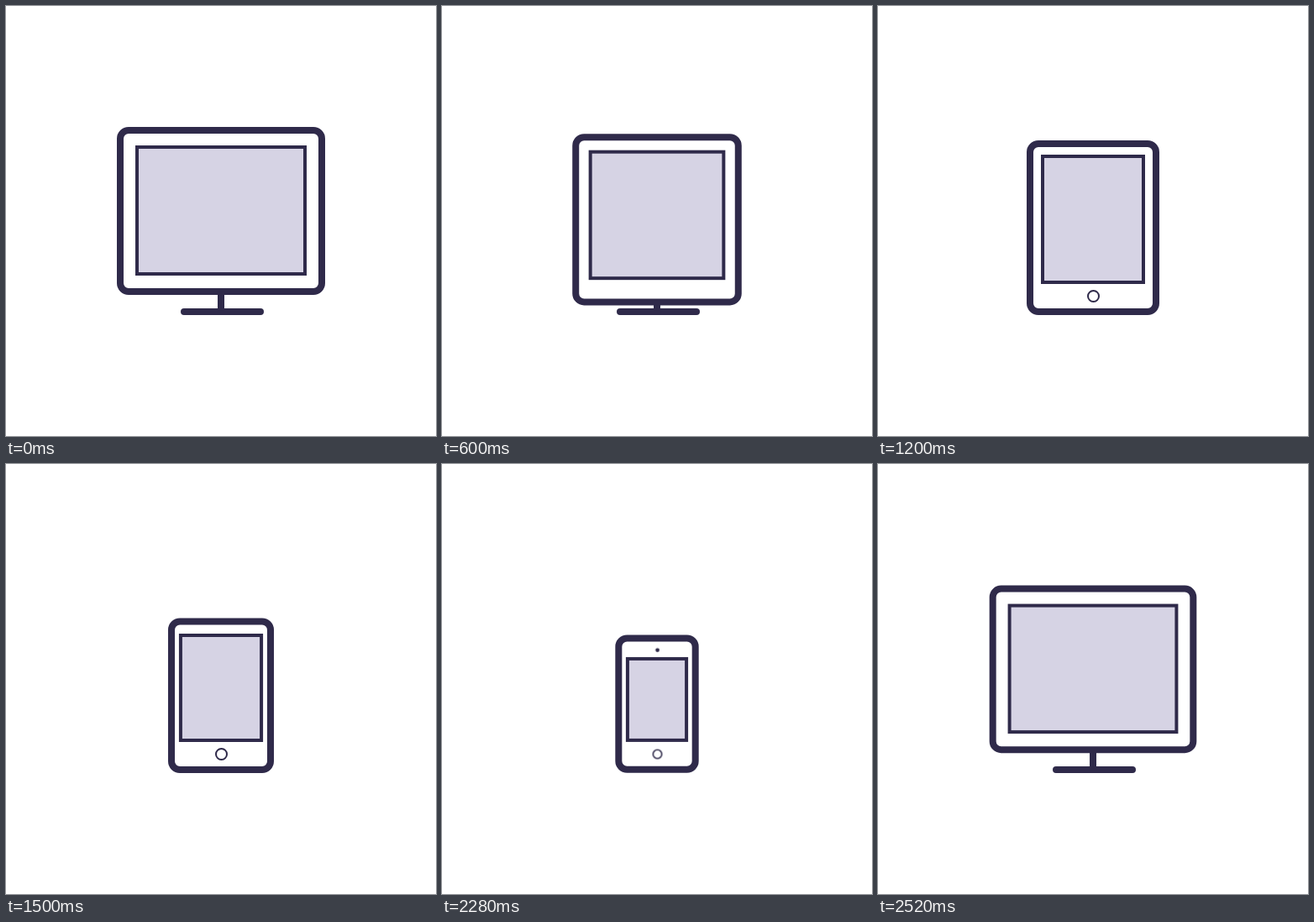
Recreate the animation shown at these times as an HTML page. Size 512 by 512 pixels, loop 2.55 s.

```html
<!DOCTYPE html>
<html lang="en">
<head>
<meta charset="utf-8">
<title>Responsive devices</title>
<style>
  html, body { margin: 0; width: 100%; height: 100%; overflow: hidden; background: #fff; }
  svg { display: block; width: 100%; height: 100%; }

  .stand, .body, .screen, .button { stroke: #2f2a4a; }
  .stand { fill: none; stroke-width: 8; stroke-linecap: round; }
  .body { fill: #fff; stroke-width: 8; rx: 10px; }
  .screen { fill: #d6d3e4; stroke-width: 4; }
  .button { fill: none; stroke-width: 2; }
  .camera { fill: #2f2a4a; }
  .button, .camera { transform-box: fill-box; transform-origin: center; }

  .stand, .body, .screen, .button, .camera {
    animation: 2550ms cubic-bezier(.333, 0, .667, 1) infinite;
  }
  .body { animation-name: body; }
  .screen { animation-name: screen; }
  .stand { animation-name: stand; animation-timing-function: step-end; }
  .button { animation-name: button; animation-timing-function: linear; }
  .camera { animation-name: camera; animation-timing-function: linear; }

  /* desktop, tablet, phone, desktop */
  @keyframes body {
    0%, 18.12%, 99.41%, 100% { x: 136px; y: 148px; width: 240px; height: 192px; }
    28.71%, 53.29% { x: 181px; y: 164px; width: 150px; height: 200px; }
    63.88%, 88.82% { x: 211px; y: 208px; width: 90px; height: 156px; }
  }
  @keyframes screen {
    0%, 18.12%, 99.41%, 100% { x: 156px; y: 168px; width: 200px; height: 151px; }
    28.71%, 53.76% { x: 196px; y: 179px; width: 120px; height: 150px; }
    64.35%, 88.82% { x: 221.5px; y: 232.5px; width: 69px; height: 96.5px; }
  }
  @keyframes stand {
    0%, 90.2%, 100% { visibility: visible; }
    39.2% { visibility: hidden; }
  }
  @keyframes button {
    0%, 23.53%, 94.12%, 100% { transform: scale(0); }
    29.41%, 88.24% { transform: scale(1); }
  }
  @keyframes camera {
    0%, 60%, 94.12%, 100% { transform: scale(0); }
    64.71%, 88.24% { transform: scale(1); }
  }
</style>
</head>
<body>
<svg viewBox="0 0 512 512">
  <path class="stand" d="M256 340V364M212 364H303"/>
  <rect class="body" x="136" y="148" width="240" height="192"/>
  <rect class="screen" x="156" y="168" width="200" height="151"/>
  <circle class="button" cx="256.5" cy="345.5" r="6.5"/>
  <circle class="camera" cx="256.5" cy="221.5" r="3"/>
</svg>
<script>
  // Advance the eased keyframes in whole ticks.
  const TICK = 30, LOOP = 2550;
  const start = performance.now();
  const animations = document.getAnimations();
  animations.forEach(animation => animation.pause());

  function draw() {
    const elapsed = (performance.now() - start + 0.5) % LOOP;
    const time = Math.floor(elapsed / TICK) * TICK;
    animations.forEach(animation => { animation.currentTime = time; });
    requestAnimationFrame(draw);
  }
  draw();
</script>
</body>
</html>
```
